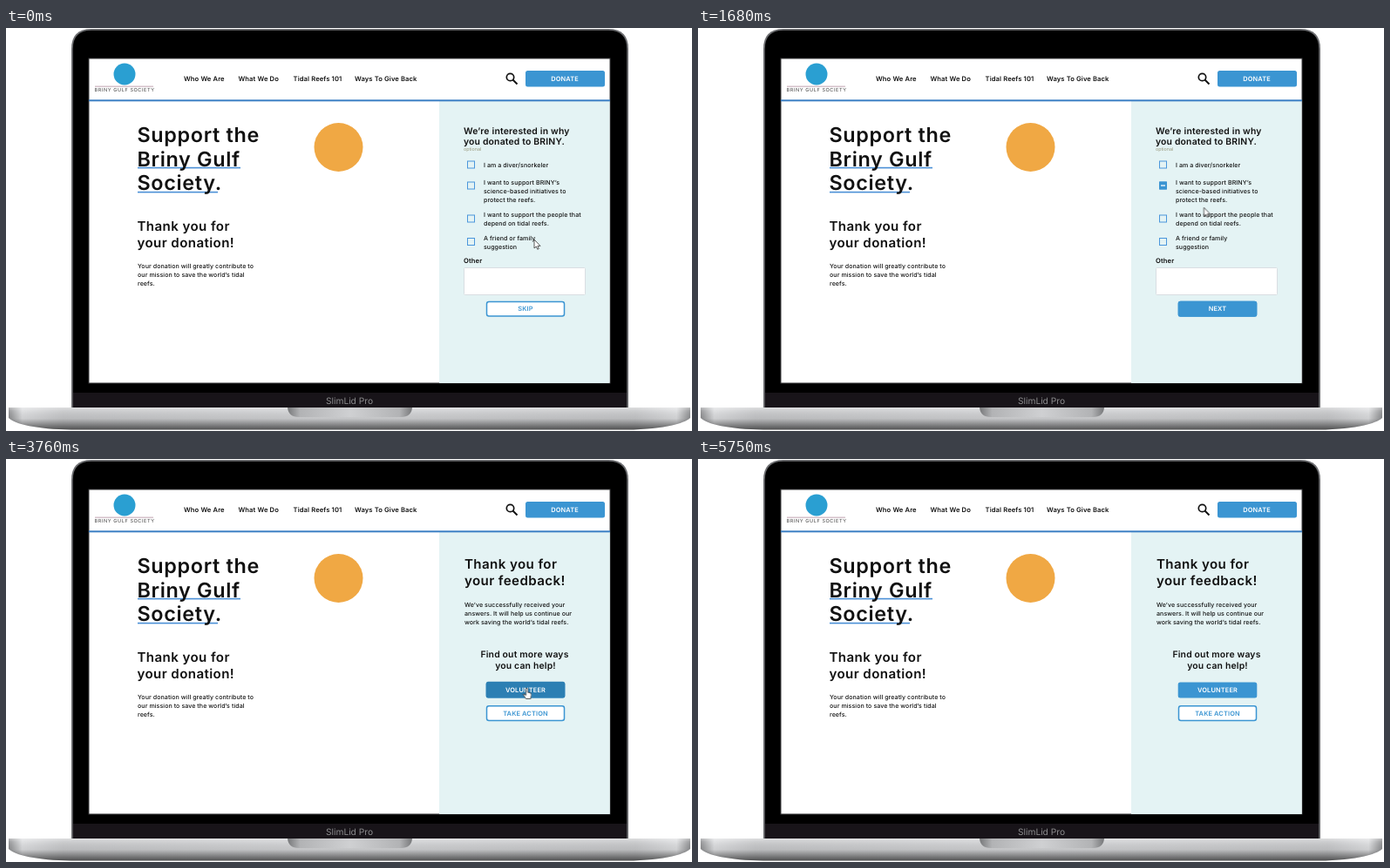
Recreate the animation shown at these times as an HTML page. Size 787 by 463 pixels, loop 6130 ms.

```html
<!DOCTYPE html>
<html lang="en">
<head>
<meta charset="utf-8">
<title>Donation feedback</title>
<style>
html, body { margin: 0; width: 100%; height: 100%; overflow: hidden; background: #fff; }
svg {
  display: block; width: 787px; height: 463px;
  font-family: Inter, "Open Sans", sans-serif; font-weight: 600;
  text-rendering: geometricPrecision;
}
text { fill: #111; }

.h1 { font-size: 23.4px; letter-spacing: .028em; }
.h2 { font-size: 15.1px; letter-spacing: .027em; }
.h3 { font-size: 10.4px; letter-spacing: .017em; }
.nav { font-size: 7.6px; letter-spacing: .015em; }
.body { font-size: 7.05px; font-weight: 500; letter-spacing: .01em; }
.btn { font-size: 7.4px; letter-spacing: .02em; }
.brand { font-size: 5.6px; font-weight: 400; letter-spacing: .1em; fill: #444; }
.chin { font-size: 10.2px; font-weight: 400; fill: #8c8c8e; }
.tiny { font-size: 5.4px; font-weight: 400; fill: #98987c; }
.typed { font-size: 5.7px; font-weight: 500; letter-spacing: .03em; fill: #333; }
.mid { text-anchor: middle; }
.light { fill: #fff; }
.blue { fill: #3b95d2; }
.dark { fill: #2c7fb3; }
.line { fill: #fff; stroke: #3b95d2; stroke-width: 1.5; }
.box { fill: none; stroke: #4a96dc; }
.panel { fill: #e4f3f4; }

/* 80 equal ticks per loop: one tick is 1.25% */
.a { animation: 6130ms step-end -10ms infinite; }
.off { opacity: 0; }
#cursor { animation-name: move; }
#arrow { animation-name: arrow; }
#hand { animation-name: hand; }
#glow { animation-name: glow; }
#checked { animation-name: checked; }
#answer { animation-name: answer; }
#nextHover { animation-name: nextHover; }
#thanks { animation-name: thanks; }
#joinHover { animation-name: joinHover; }
#actHover { animation-name: actHover; }

@keyframes move {
  0% { transform: translate(606px, 243px); animation-timing-function: steps(7); }
  8.75% { transform: translate(579.5px, 188.5px); }
  26.25% { transform: translate(579.5px, 188.5px); animation-timing-function: steps(6); }
  33.75% { transform: translate(585px, 295px); animation-timing-function: steps(2); }
  36.25% { transform: translate(596.5px, 325px); }
  55% { transform: translate(596.5px, 325px); animation-timing-function: steps(5); }
  61.25% { transform: translate(597.5px, 263px); }
  62.5% { transform: translate(597.5px, 263px); animation-timing-function: steps(2); }
  65% { transform: translate(601px, 265px); }
  66.25% { transform: translate(601px, 265px); animation-timing-function: steps(3); }
  70% { transform: translate(606px, 266px); }
  75% { transform: translate(606px, 266px); animation-timing-function: steps(2); }
  77.5% { transform: translate(610px, 267px); }
  78.75% { transform: translate(610px, 267px); animation-timing-function: steps(3); }
  82.5% { transform: translate(615.5px, 270px); animation-timing-function: steps(3); }
  86.25% { transform: translate(606px, 289px); opacity: 1; }
  90%, 100% { transform: translate(606px, 289px); opacity: 0; }
}
@keyframes arrow { 0%, 27.5% { opacity: 1; } 7.5%, 60%, 100% { opacity: 0; } }
@keyframes hand { 0%, 27.5% { opacity: 0; } 7.5%, 60%, 100% { opacity: 1; } }
@keyframes glow { 15% { opacity: 1; } 17.5% { opacity: .5; } 20% { opacity: 0; } }
@keyframes checked { 17.5% { opacity: .5; } 20%, 100% { opacity: 1; } }
@keyframes answer { 32.5%, 100% { opacity: 1; } }
@keyframes nextHover {
  36.25% { opacity: 0; animation-timing-function: steps(2); }
  38.75%, 100% { opacity: 1; }
}
@keyframes thanks {
  45% { opacity: .15; }
  46.25% { opacity: .4; }
  47.5% { opacity: .75; }
  48.75%, 100% { opacity: 1; }
}
@keyframes joinHover {
  60% { opacity: .5; }
  61.25% { opacity: 1; }
  83.75% { opacity: .5; }
  85%, 100% { opacity: 0; }
}
@keyframes actHover {
  85% { opacity: .5; }
  86.25% { opacity: 1; }
  91.25% { opacity: 1; animation-timing-function: steps(2); }
  93.75%, 100% { opacity: 0; }
}
</style>
</head>
<body>
<svg viewBox="0 0 787 463">
  <defs>
    <linearGradient id="metal">
      <stop offset="0" stop-color="#8d8e90"/>
      <stop offset=".02" stop-color="#dcdddf"/>
      <stop offset=".08" stop-color="#c6c7c9"/>
      <stop offset=".5" stop-color="#d2d3d5"/>
      <stop offset=".92" stop-color="#c6c7c9"/>
      <stop offset=".98" stop-color="#dcdddf"/>
      <stop offset="1" stop-color="#8d8e90"/>
    </linearGradient>
    <linearGradient id="shade" x2="0" y2="1">
      <stop offset="0" stop-color="#fff" stop-opacity=".4"/>
      <stop offset=".15" stop-color="#fff" stop-opacity=".1"/>
      <stop offset=".5" stop-color="#000" stop-opacity=".06"/>
      <stop offset="1" stop-color="#000" stop-opacity=".6"/>
    </linearGradient>
    <linearGradient id="notch">
      <stop offset="0" stop-color="#77787a"/>
      <stop offset=".1" stop-color="#b2b3b5"/>
      <stop offset=".5" stop-color="#cfd0d2"/>
      <stop offset=".9" stop-color="#b2b3b5"/>
      <stop offset="1" stop-color="#77787a"/>
    </linearGradient>
    <path id="base" d="M3 436H785V448C777 455 752 461 712 461.500H75C35 461 10 455 3 448Z"/>
  </defs>

  <!-- Laptop -->
  <path d="M75 437V24Q75 1 98 1H691Q714 1 714 24V437Z" fill="#6c6d70"/>
  <path d="M76.800 437V24Q76.800 2.800 98 2.800H691Q712.200 2.800 712.200 24V437Z"/>
  <rect x="77" y="419" width="635" height="17" fill="#181419"/>
  <text class="chin mid" x="394" y="432">SlimLid Pro</text>
  <use href="#base" fill="url(#metal)"/>
  <use href="#base" fill="url(#shade)"/>
  <path d="M323 436H466Q465 447 453 447H336Q324 447 323 436Z" fill="url(#notch)"/>

  <!-- Page -->
  <rect x="95" y="35" width="598" height="373" fill="#fff" stroke="#3a3a3c"/>
  <circle cx="136" cy="53" r="12.500" fill="#2a9fd2"/>
  <rect x="102" y="66.700" width="67" height=".8" fill="#b08a9c"/>
  <text class="brand" x="101.500" y="73.300">BRINY GULF SOCIETY</text>
  <g class="nav">
    <text x="204" y="61">Who We Are</text>
    <text x="266.500" y="61">What We Do</text>
    <text x="329.500" y="61">Tidal Reefs 101</text>
    <text x="400" y="61">Ways To Give Back</text>
  </g>
  <g fill="none" stroke="#111" stroke-width="1.700">
    <circle cx="578.500" cy="56.500" r="4.200"/>
    <path d="M581.500 59.500L586.500 64.500" stroke-width="2"/>
  </g>
  <rect class="blue" x="596" y="49" width="91" height="18.500" rx="2.500"/>
  <text class="btn mid light" x="641" y="61">DONATE</text>

  <rect x="151" y="159.800" width="118" height="1.600" fill="#4a8fd6"/>
  <rect x="151" y="187.800" width="92" height="1.600" fill="#4a8fd6"/>
  <text class="h1" y="131"><tspan x="150.500">Support the</tspan><tspan x="150.500" dy="27.500">Briny Gulf</tspan><tspan x="150.500" dy="27.500">Society.</tspan></text>
  <circle cx="381.500" cy="137" r="28" fill="#f0a844"/>
  <text class="h2" y="233"><tspan x="150.500">Thank you for</tspan><tspan x="150.500" dy="18.500">your donation!</tspan></text>
  <text class="body" y="276"><tspan x="151">Your donation will greatly contribute to</tspan><tspan x="151" dy="10">our mission to save the world’s tidal</tspan><tspan x="151" dy="10">reefs.</tspan></text>

  <!-- Question form -->
  <rect class="panel" x="497" y="84" width="195.500" height="324"/>
  <text class="h3" y="121.500"><tspan x="525">We’re interested in why</tspan><tspan x="525" dy="12.500">you donated to BRINY.</tspan></text>
  <text class="tiny" x="525" y="141">optional</text>
  <g class="box">
    <rect x="529.500" y="153" width="8" height="8"/>
    <rect x="529.500" y="177" width="8" height="8"/>
    <rect x="529.500" y="215" width="8" height="8"/>
    <rect x="529.500" y="241.500" width="8" height="8"/>
  </g>
  <g class="body">
    <text x="548" y="160">I am a diver/snorkeler</text>
    <text y="180"><tspan x="548">I want to support BRINY’s</tspan><tspan x="548" dy="10">science-based initiatives to</tspan><tspan x="548" dy="10">protect the reefs.</tspan></text>
    <text y="216.800"><tspan x="548">I want to support the people that</tspan><tspan x="548" dy="10">depend on tidal reefs.</tspan></text>
    <text y="243.500"><tspan x="548">A friend or family</tspan><tspan x="548" dy="10">suggestion</tspan></text>
  </g>
  <text class="nav" x="525" y="269.800">Other</text>
  <rect x="525.500" y="275.500" width="139" height="31" rx="1" fill="#fff" stroke="#d9dee2"/>
  <rect class="line" x="551.500" y="314.500" width="89" height="16.500" rx="2.500"/>
  <text class="btn mid blue" x="596" y="325.200">SKIP</text>

  <g id="checked" class="a off">
    <rect class="blue" x="529" y="176.500" width="9" height="9" rx="1"/>
    <path d="M531 181H536" stroke="#fff" stroke-width="1.300"/>
    <rect class="blue" x="550.700" y="313.700" width="90.600" height="18" rx="2.500"/>
    <rect id="nextHover" class="a off dark" x="550.700" y="313.700" width="90.600" height="18" rx="2.500"/>
    <text class="btn mid light" x="596" y="325.200">NEXT</text>
  </g>
  <g id="answer" class="a off">
    <rect x="525.500" y="275.500" width="139" height="31" rx="1.500" fill="#fff" stroke="#8f979c"/>
    <text class="typed" y="283"><tspan x="528">I heard they do work in my local area in</tspan><tspan x="528" dy="6.300">Lauo.|</tspan></text>
  </g>

  <!-- Feedback received -->
  <g id="thanks" class="a off">
    <rect class="panel" x="497" y="84" width="195.500" height="324"/>
    <text class="h2" y="126"><tspan x="526">Thank you for</tspan><tspan x="526" dy="18.500">your feedback!</tspan></text>
    <text class="body" y="169.500"><tspan x="526">We’ve successfully received your</tspan><tspan x="526" dy="10">answers. It will help us continue our</tspan><tspan x="526" dy="10">work saving the world’s tidal reefs.</tspan></text>
    <text class="h3 mid" y="228.300"><tspan x="595">Find out more ways</tspan><tspan x="596" dy="12.500">you can help!</tspan></text>
    <rect class="blue" x="550.700" y="256.500" width="90.600" height="18" rx="2.500"/>
    <rect id="joinHover" class="a off dark" x="550.700" y="255.700" width="90.600" height="18.800" rx="2.500"/>
    <text class="btn mid light" x="596" y="268">VOLUNTEER</text>
    <rect class="line" x="551.500" y="283.700" width="89" height="16.800" rx="2.500"/>
    <text class="btn mid blue" x="596" y="294.800">TAKE ACTION</text>
    <g id="actHover" class="a off">
      <rect x="551.500" y="283.700" width="89" height="16.800" rx="2.500" fill="#e3f0f9" stroke="#2c7fb3" stroke-width="1.500"/>
      <text class="btn mid dark" x="596" y="294.800">TAKE ACTION</text>
    </g>
  </g>

  <!-- Header rule sits above the panel -->
  <rect x="95" y="82.300" width="598" height="2" fill="#3b7fc4"/>

  <g id="cursor" class="a">
    <circle id="glow" class="a off" cx="0" cy="2" r="7" fill="#f7e23c" fill-opacity=".85"/>
    <g fill="#fff" stroke="#333" stroke-width=".8" stroke-linejoin="round">
      <path id="arrow" class="a" d="M0 0V10L2.300 8L3.800 11.300L5.300 10.600L3.900 7.400H7Z"/>
      <path id="hand" class="a off" d="M-1 1Q0 -.8 1 1V5L4 5.800Q5.600 6.300 5.200 8.500L4.300 12.500H-1L-3.800 8Q-4.300 6.500 -3 7L-1 8.500Z"/>
    </g>
  </g>
</svg>
</body>
</html>
```
